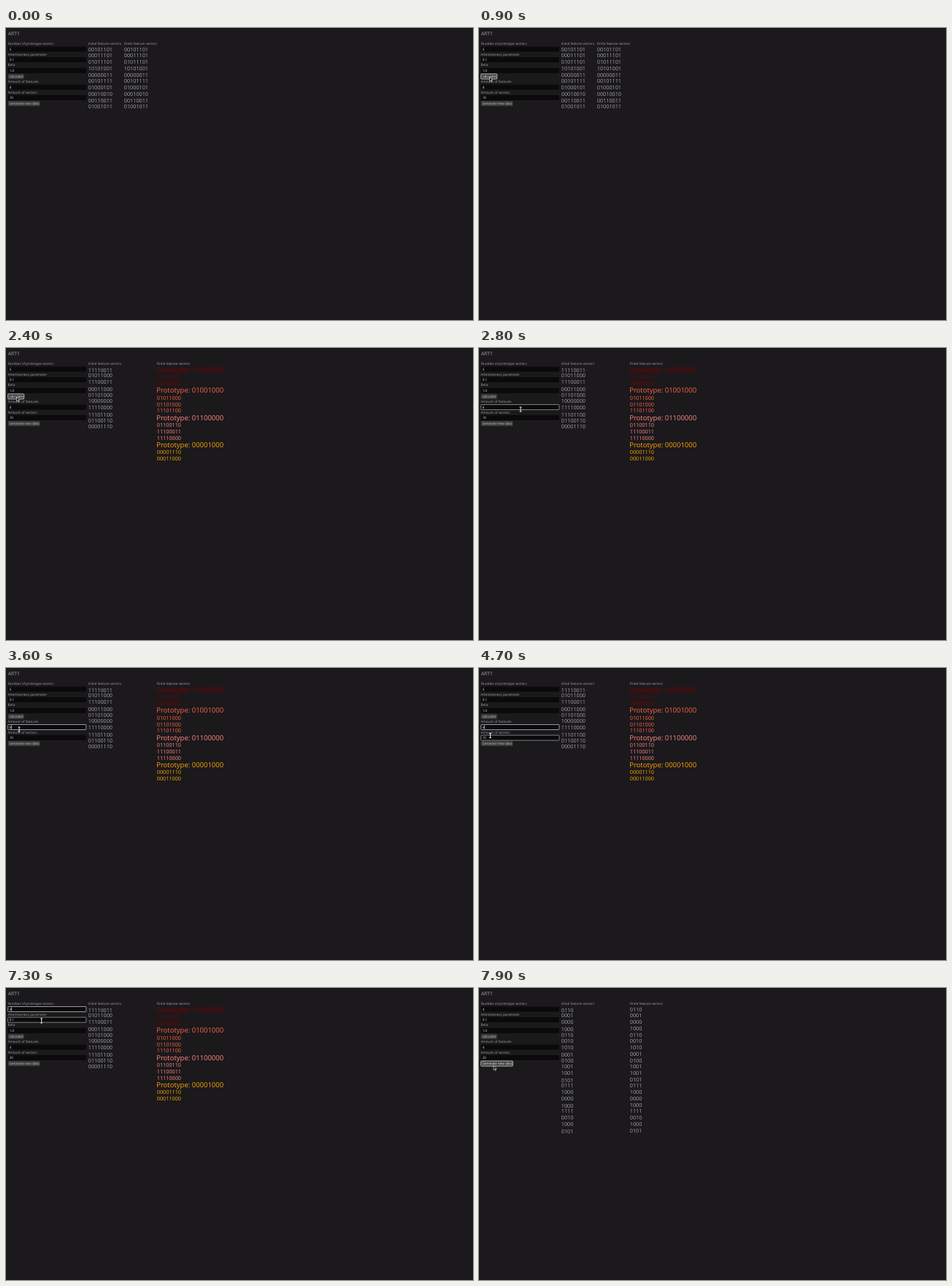
Write an HTML page that moves like this. It is 640 px wide and 400 px high and loops after 8 s.

```html
<!DOCTYPE html>
<html lang="en">
<head>
<meta charset="utf-8">
<title>ART1</title>
<style>
html, body { margin: 0; width: 100%; height: 100%; overflow: hidden; background: #1b191c; }
svg { display: block; width: 640px; height: 400px; }
text { font-family: 'Open Sans', 'Noto Sans', sans-serif; text-rendering: geometricPrecision; }
</style>
</head>
<body>
<svg id="stage" viewBox="0 0 640 400"></svg>
<script>
const LOOP = 8000, STEP = 100, MOVE = 400;
const ROW = 8.74, SMALL = 4.63, DIGITS = 7.25, HEAD = 9.5, GRAY = '#a4a4a4';
const FIELD_W = 107.2, BOX_H = 7;
const stage = document.getElementById('stage');

const first = '00101101 00011101 01011101 10101001 00000011 00101111 01000101 00010010 00110011 01001011'.split(' ');
const second = '11110011 01011000 11100011 00011000 01101000 10000000 11110000 11101100 01100110 00001110'.split(' ');
const third = ('0110 0001 0000 1000 0110 0010 1010 0001 0100 1001 ' +
  '1001 0101 0111 1000 0000 1000 1111 0010 1000 0101').split(' ');
const colors = ['#7c0000', '#ff6347', '#ff8a80', '#ffa500'];

// Timelines: [start ms, value]; groups list the row digits of each cluster
const scenes = [
  [0, { data: first, x: 161.8 }],
  [1000, { data: first, x: 206.8, groups: '7 501236489' }],
  [2000, { data: second, x: 206.8 }],
  [2400, { data: second, x: 206.8, groups: '05 147 826 93' }],
  [7800, { data: third, x: 206.8 }]
];
const focus = [[0, -1], [3000, 3], [4800, 4], [6100, 0], [7700, -1]];

const fields = [
  ['Number of prototype vectors', [[0, '5'], [6800, ''], [7000, '4']]],
  ['Attentiveness parameter', [[0, '0.1']]],
  ['Beta', [[0, '1.0']]],
  ['Amount of features', [[0, '8'], [3900, ''], [4400, '4']]],
  ['Amount of vectors', [[0, '10'], [5000, ''], [5200, '2'], [5400, '20']]]
].map(([label, value], i) => ({ label, value, y: 29 + i * 14.6 + (i > 2 ? 8.2 : 0) }));

const buttons = [
  { label: 'calculate', y: 66.4, w: 22 },
  { label: 'Generate new data', y: 103.5, w: 43.6 }
];

// Pointer stops: [arrival ms, x, y]
const stops = [
  [100, 60, 188], [500, 48, 125], [800, 14.5, 67], [1700, 42, 102], [2400, 14.5, 67], [2800, 57, 84],
  [3600, 18, 84], [4700, 15.5, 92.6], [6000, 78.5, 30.5], [6500, 54, 33.5], [7600, 20, 106.2]
];

const at = (list, t) => list.filter(e => e[0] <= t).pop()[1];

function pointer(t) {
  if (t < stops[0][0]) return null;
  let [, x, y] = stops[0];
  for (const [end, x1, y1] of stops.slice(1)) {
    const u = Math.min(1, Math.max(0, (t - end) / MOVE + 1)), ease = u * u * (3 - 2 * u);
    x += (x1 - x) * ease;
    y += (y1 - y) * ease;
  }
  return { x, y };
}

const text = (x, y, size, fill, s) =>
  `<text x="${x}" y="${y}" font-size="${size}" fill="${fill}">${s}</text>`;
const box = (y, w, fill, stroke) =>
  `<rect x="2.7" y="${y - BOX_H / 2}" width="${w}" height="${BOX_H}" rx=".8" fill="${fill}" stroke="${stroke}" stroke-width=".75"/>`;
const inside = (p, y, w) => p && p.x >= 2.7 && p.x <= 2.7 + w && Math.abs(p.y - y) <= BOX_H / 2;

function drawField(f, i, t, p) {
  const value = at(f.value, t), focused = at(focus, t) === i;
  const stroke = focused ? '#c4c8cc' : inside(p, f.y, FIELD_W) ? '#a0a0a0' : 'none';
  let out = text(2.6, f.y - 5.9, SMALL, GRAY, f.label) + box(f.y, FIELD_W, '#0a0a0a', stroke) +
    text(4.7, f.y + 1.7, SMALL, '#ddd', value);
  if (focused) {
    const x = 4.9 + value.length * SMALL * .572;
    out += `<path d="M${x} ${f.y - 2.6}v5.2" stroke="#d8e4f0" stroke-width=".7"/>`;
  }
  return out;
}

function drawButton(b, p) {
  const hot = inside(p, b.y, b.w);
  return box(b.y, b.w, '#3c3c3c', hot ? '#e8e8e8' : 'none') +
    text(4.6, b.y + 1.5, SMALL, hot ? '#fff' : '#c4c4c4', b.label);
}

// A prototype keeps the bits that all its members share
const shared = members =>
  [...members[0]].map((_, i) => members.every(m => m[i] === '1') ? 1 : 0).join('');

function drawClusters({ data, x, groups }) {
  let y = 29.6, out = '';
  groups.split(' ').forEach((group, g) => {
    const members = [...group].map(i => data[i]);
    out += text(x - .6, y + 3.3, HEAD, colors[g], 'Prototype: ' + shared(members));
    members.forEach((m, i) => out += text(x, y + 12.6 + i * ROW, DIGITS, colors[g], m));
    y += 11.1 + members.length * ROW;
  });
  return out;
}

const column = (data, x, nudge) =>
  data.map((v, i) => text(x, 31.6 + i * ROW + nudge(i), DIGITS, GRAY, v)).join('');

function drawPointer(p) {
  if (!p) return '';
  const shape = fields.some(f => inside(p, f.y, FIELD_W))
    ? '<path d="M-1.4-3h2.8M0-3v6M-1.4 3h2.8" stroke="#fff" stroke-width=".9"/>'
    : '<path d="M0 0v6l1.4-1.2 1 2.2.9-.4-.9-2.1 1.6-.2z" fill="#000" stroke="#fff" stroke-width=".6"/>';
  return `<g transform="translate(${p.x} ${p.y})">${shape}</g>`;
}

function draw(t) {
  const s = at(scenes, t), p = pointer(t);
  // Rows sit a little unevenly once results have been shown
  const uneven = i => s.x > 200 && (i === 0 || i % 4 === 3) ? .9 : 0;
  stage.innerHTML = text(2.8, 9.6, 6.8, GRAY, 'ART1') +
    fields.map((f, i) => drawField(f, i, t, p)).join('') +
    buttons.map(b => drawButton(b, p)).join('') +
    text(112.4, 23.1, SMALL, GRAY, 'Initial feature vectors') +
    text(s.x - .2, 23.1, SMALL, GRAY, 'Finite feature vectors') +
    column(s.data, 112.8, uneven) +
    (s.groups ? drawClusters(s) : column(s.data, s.x, () => 0)) +
    drawPointer(p);
}

let shown = -1;
function tick() {
  const t = Math.floor(performance.now() % LOOP / STEP) * STEP;
  if (t !== shown) draw(shown = t);
  requestAnimationFrame(tick);
}
tick();
</script>
</body>
</html>
```
